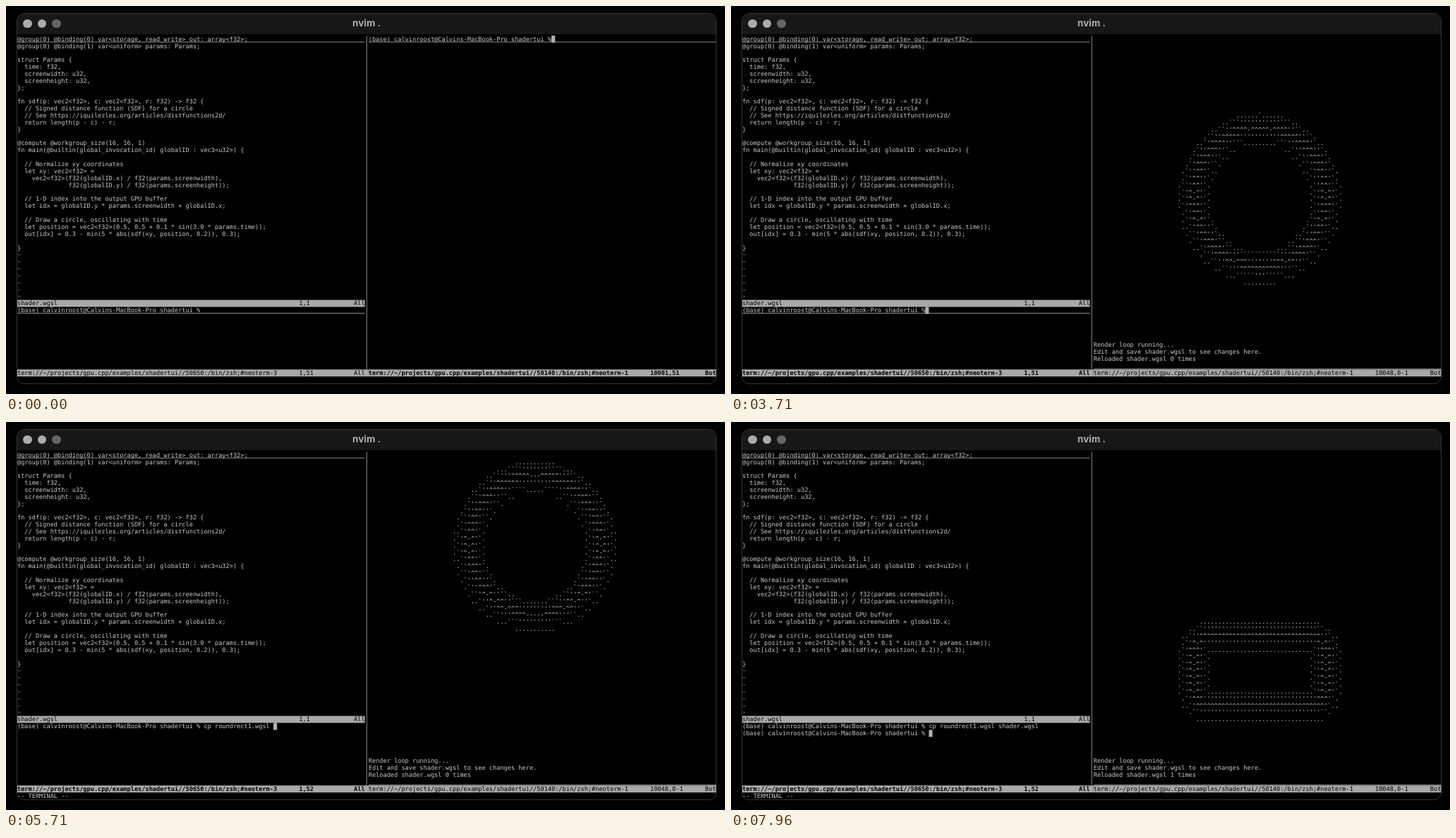
An HTML page that plays this animation: 1019x550 px, repeating every 8000 ms.

```html
<!DOCTYPE html>
<html lang="en">
<head>
<meta charset="utf-8">
<title>nvim .</title>
<style>
html, body { margin: 0; width: 100%; height: 100%; overflow: hidden; background: #000; }
.window {
  position: absolute; left: 15px; top: 10px; width: 992px; height: 526px; box-sizing: border-box;
  border: 1px solid #363636; border-radius: 11px; overflow: hidden;
}
.bar { height: 28.5px; background: #171717; }
.light { position: absolute; top: 7.7px; width: 12.6px; height: 12.6px; border-radius: 50%; background: #ababab; }
.title {
  position: absolute; left: 0; right: 0; top: 0; text-align: center; color: #aaa;
  font: 700 13.5px/27px Inter, sans-serif;
}
/* Laid out at 20px type, then scaled so a cell is 5.185 x 9.86 pixels. */
.term {
  position: absolute; left: 16px; top: 41.5px; transform: scale(.43061); transform-origin: 0 0;
  font: 20px/22.898px "DejaVu Sans Mono", monospace; text-rendering: geometricPrecision;
  font-variant-ligatures: none; color: #c9c9c9;
}
.term > * {
  position: absolute; margin: 0; font: inherit; white-space: pre;
  left: calc(var(--c, 0) * 12.041px); top: calc(var(--r, 0) * 22.898px);
  width: calc(var(--w, 95) * 12.041px);
}
.status { background: #a9a9a9; color: #000; height: 22.898px; }
.status.on { font-weight: 700; }
.line { height: 2px; margin-top: 19.6px; background: #a2a2a2; }
.rule { width: 2.4px; height: 1099px; margin-left: 5px; background: #a2a2a2; }
.cursor { height: 22.898px; background: #b0b0b0; }
.dim { color: #777; }
</style>
</head>
<body>
<div class="window">
  <div class="bar"></div>
  <div class="light" style="left:8px"></div>
  <div class="light" style="left:28.7px"></div>
  <div class="light" style="left:49px;background:#656565"></div>
  <div class="title">nvim .</div>
</div>
<div class="term">
<pre id="code">
@group(0) @binding(0) var&lt;storage, read_write&gt; out: array&lt;f32&gt;;
@group(0) @binding(1) var&lt;uniform&gt; params: Params;

struct Params {
  time: f32,
  screenwidth: u32,
  screenheight: u32,
};

fn sdf(p: vec2&lt;f32&gt;, c: vec2&lt;f32&gt;, r: f32) -&gt; f32 {
  // Signed distance function (SDF) for a circle
  // See https://iquilezles.org/articles/distfunctions2d/
  return length(p - c) - r;
}

@compute @workgroup_size(16, 16, 1)
fn main(@builtin(global_invocation_id) globalID : vec3&lt;u32&gt;) {

  // Normalize xy coordinates
  let xy: vec2&lt;f32&gt; =
    vec2&lt;f32&gt;(f32(globalID.x) / f32(params.screenwidth),
              f32(globalID.y) / f32(params.screenheight));

  // 1-D index into the output GPU buffer
  let idx = globalID.y * params.screenwidth + globalID.x;

  // Draw a circle, oscillating with time
  let position = vec2&lt;f32&gt;(0.5, 0.5 + 0.1 * sin(3.0 * params.time));
  out[idx] = 0.3 - min(5 * abs(sdf(xy, position, 0.2)), 0.3);

}</pre>
<pre class="dim" style="--r:31">~
~
~
~
~
~
~</pre>
<div class="rule" style="--c:95;width:2.4px"></div>
<div class="line"></div>
<div class="line" id="shellLine" style="--r:39"></div>
<div class="line" id="outLine" style="--c:96"></div>
<div class="cursor" id="cursor" style="--w:1"></div>
<pre id="shell" style="--r:39"></pre>
<pre id="out" style="--c:96"></pre>
<div class="status" id="codeBar" style="--r:38"></div>
<div class="status" id="shellBar" style="--r:48;--w:96"></div>
<div class="status" id="outBar" style="--r:48;--c:96"></div>
<div id="mode" style="--r:49">-- TERMINAL --</div>
</div>
<script>
const LOOP = 8000;
const T = { insert: 1320, run: 1760, render: 2050, leave: 3250, focus: 3480, shell: 4100, enter: 6560, reload: 6640 };
const COLS = 90, ROWS = 50, HIDDEN = 7;
const RAMP = " .`'^-+=*x17X$8#%@";

const $ = id => document.getElementById(id);
const PROMPT = "(base) calvinroost@Calvins-MacBook-Pro shadertui %";
const PATH = "term://~/projects/gpu.cpp/examples/shadertui//";

const info = s => "[info] " + s;
const LOG = [
  ". /Users/calvinroost/projects/gpu.cpp/examples/shadertui/../../source && ./build/shadertui",
  ...["Requesting adapter", "Requesting device", "Creating screen tensor",
    "Loading shader code from shader.wgsl", "Creating shader and kernel", "Shader code:"].map(info),
  ...$("code").textContent.split("\n"),
  "",
  ...["Create layout entry for the params buffer", "Create bind group entry for the params buffer",
    "paramIndex: 1", "Starting render loop"].map(info)
];
const LOG_STEPS = [[1760, 0], [1785, 1], [1815, 7], [1845, 39], [1870, LOG.length]];

const circle = (x, y) => Math.hypot(x, y) - 0.2;
function roundRect(x, y) {
  const r = 0.05, qx = Math.abs(x) - 0.2 + r, qy = Math.abs(y) - 0.1 + r;
  return Math.hypot(Math.max(qx, 0), Math.max(qy, 0)) + Math.min(Math.max(qx, qy), 0) - r;
}

function raster(t) {
  const s = t / 1000, swapped = t >= T.reload;
  const sdf = swapped ? roundRect : circle;
  const cy = 0.5 + (swapped
    ? 0.3 * Math.sin(4.249 + 4.47 * (s - 7.04))
    : 0.1 * Math.sin(6.931 + 4.905 * (s - 4.86)));
  const lines = [];
  for (let r = HIDDEN; r < ROWS; r++) {
    let line = "";
    for (let c = 0; c < COLS; c++) {
      const d = Math.abs(sdf(c / COLS - 0.5, r / ROWS - cy));
      line += RAMP[Math.floor((0.3 - Math.min(5 * d, 0.3)) * 17)];
    }
    lines.push(line);
  }
  return lines.concat("", "Render loop running...", "Edit and save shader.wgsl to see changes here.",
    `Reloaded shader.wgsl ${swapped ? 1 : 0} times`).join("\n");
}

// Part of a string typed by time t, one key every `gap` ms.
const typed = (t, start, gap, s) => s.slice(0, Math.max(0, Math.floor((t - start) / gap) + 1));
const makeCmd = t => typed(t, 1500, 50, "make");
const copyCmd = t => typed(t, 4500, 90, "cp ") + typed(t, 4930, 70, "roundrect") +
  typed(t, 5610, 1, "1") + typed(t, 5690, 1, ".wgsl ") +
  typed(t, 5950, 90, "sha") + typed(t, 6250, 1, "der.wgsl ");
const logCount = t => LOG_STEPS.reduce((n, [at, count]) => t >= at ? count : n, 0);

const bar = (name, ruler, pos) => name.padEnd(77) + ruler.padEnd(15) + pos;
const escape = s => s.replace(/&/g, "&amp;").replace(/</g, "&lt;");
const shown = {};
function fill(id, text) {
  if (shown[id] === text) return;
  shown[id] = text;
  $(id).innerHTML = escape(text).replace(/\[info\]/g, '[<span class="dim">info</span>]');
}
const show = (id, on) => { $(id).style.visibility = on ? "visible" : "hidden"; };
function place(id, row, col) {
  $(id).style.setProperty("--r", row);
  $(id).style.setProperty("--c", col);
}

function cursorAt(t) {
  if (t < T.insert) return [0, 146];
  if (t < T.run) return [0, 147 + makeCmd(t).length];
  if (t < T.render) return [1 + logCount(t), 96];
  if (t < T.focus) return [47, 96];
  if (t < T.shell) return [39, 50];
  if (t < T.enter) return [39, 51 + copyCmd(t).length];
  return [40, 51];
}

function draw(t) {
  fill("out", t < T.render
    ? [PROMPT + " " + makeCmd(t), ...LOG.slice(0, logCount(t))].join("\n")
    : raster(t));
  fill("shell", PROMPT + " " + copyCmd(t) + (t >= T.enter ? "\n" + PROMPT : ""));

  const left = t >= T.focus;
  fill("shellBar", bar(PATH + "50650:/bin/zsh;#neoterm-3", t < T.shell ? "1,51" : "1,52", "All"));
  fill("outBar", bar(PATH + "50140:/bin/zsh;#neoterm-1",
    t < T.insert ? "10001,51" : t < T.leave ? "10001,52" : "10048,0-1", "Bot"));
  $("shellBar").classList.toggle("on", left);
  $("outBar").classList.toggle("on", !left);

  show("mode", t >= T.insert && t < T.leave || t >= T.shell);
  show("shellLine", t < T.shell);
  show("outLine", t < T.insert || t >= T.leave);
  place("outLine", t < T.insert ? 0 : 47, 96);
  place("cursor", ...cursorAt(t));
}

fill("codeBar", bar("shader.wgsl", "1,1", "All"));
const start = performance.now();
function tick() {
  draw((performance.now() - start) % LOOP);
  requestAnimationFrame(tick);
}
tick();
</script>
</body>
</html>
```
